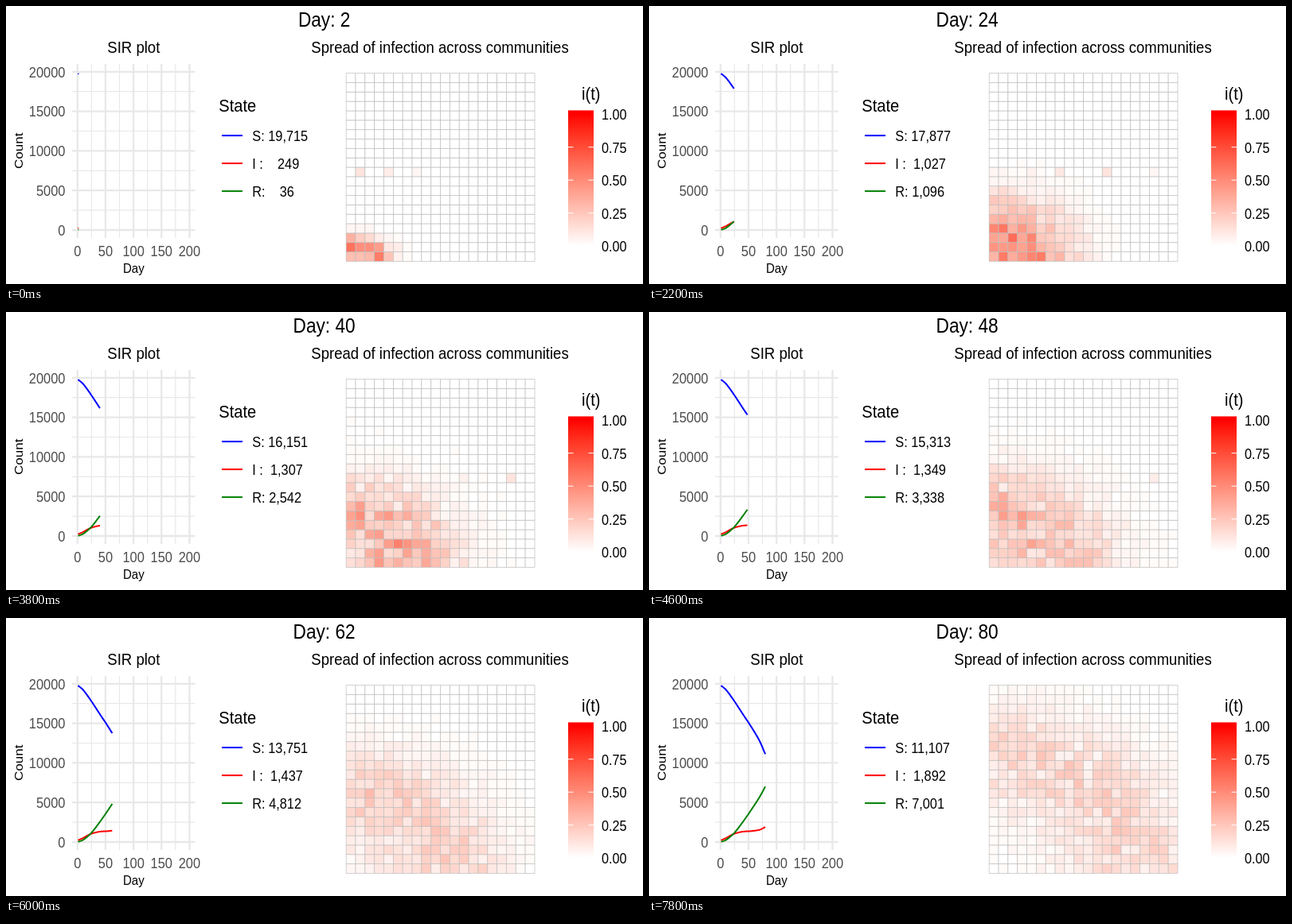
An HTML page that plays this animation: 800x350 px, repeating every 8 s.

```html
<!DOCTYPE html>
<html lang="en">
<head>
<meta charset="utf-8">
<title>SIR spread</title>
<style>
  html, body { margin: 0; width: 100%; height: 100%; overflow: hidden; background: #fff; }
  svg { display: block; width: 100%; height: 100%; }
  text { font-family: "Liberation Sans", Arial, sans-serif; white-space: pre; }
</style>
</head>
<body>
<svg id="stage" viewBox="0 0 800 350"></svg>
<script>
const svg = document.getElementById('stage');
const LOOP = 8000, STEP = 200, N = 20, PEOPLE = 50;
const SQUEEZE = 0.885; // the whole plot is narrower than it is tall

function add(tag, attrs, parent = svg) {
  const el = document.createElementNS('http://www.w3.org/2000/svg', tag);
  for (const k in attrs) el.setAttribute(k, attrs[k]);
  parent.appendChild(el);
  return el;
}
function label(str, x, y, size, anchor = 'start', fill = '#000', turn = 0) {
  const el = add('text', {
    transform: `translate(${x} ${y}) scale(${SQUEEZE} 1) rotate(${turn})`,
    'font-size': size, 'text-anchor': anchor, fill
  });
  el.textContent = str;
  return el;
}
const line = (x1, y1, x2, y2, stroke, width) =>
  add('line', { x1, y1, x2, y2, stroke, 'stroke-width': width });

// Day, infected, recovered: key points of the two smooth curves
const KEYS = [
  [2, 249, 36], [10, 504, 270], [24, 1027, 1096], [40, 1307, 2542],
  [54, 1374, 3964], [70, 1548, 5706], [80, 1892, 7001]
];
function curve(d, col) {
  const last = KEYS.length - 1;
  const slope = i => {
    const a = KEYS[Math.max(0, i - 1)], b = KEYS[Math.min(last, i + 1)];
    return (b[col] - a[col]) / (b[0] - a[0]);
  };
  let i = 0;
  while (i < last - 1 && d > KEYS[i + 1][0]) i++;
  const p = KEYS[i], q = KEYS[i + 1];
  const h = q[0] - p[0], u = (d - p[0]) / h, v = 1 - u;
  return Math.round(p[col] * v * v * (1 + 2 * u) + q[col] * u * u * (3 - 2 * u)
    + h * u * v * (slope(i) * v - slope(i + 1) * u));
}
function counts(d) {
  const i = curve(d, 1), r = curve(d, 2);
  return [N * N * PEOPLE - i - r, i, r];
}

function rand(a, b, c) {
  let h = Math.imul(a + 11, 374761393) ^ Math.imul(b + 7, 668265263) ^ Math.imul(c + 3, 1274126177);
  h = Math.imul(h ^ (h >>> 13), 1103515245);
  h = Math.imul(h ^ (h >>> 16), 2246822519);
  return ((h ^ (h >>> 15)) >>> 0) / 4294967296;
}
function noise(c, r, d) {
  const t = d / 10, k = Math.floor(t), u = t - k;
  return rand(c, r, k) * (1 - u) + rand(c, r, k + 1) * u;
}

// A noisy ring grows out of the lower left corner
function shares(d) {
  const ridge = 1 + 0.0017 * d * d;
  const ahead = 0.8 + 4.6 * (1 - Math.exp(-d / 18));
  const behind = 3 + 0.04 * d;
  const kx = 0.8 - 0.3 * Math.exp(-d / 15);
  const v = [];
  let sum = 0;
  for (let r = 0; r < N; r++) for (let c = 0; c < N; c++) {
    const off = Math.hypot(c * kx, r) - ridge;
    const wave = Math.exp(-((off / (off > 0 ? ahead : behind)) ** 2));
    const x = wave * (0.35 + 1.3 * noise(c, r, d));
    v.push(x);
    sum += x;
  }
  const gain = counts(d)[1] / PEOPLE / sum;
  const out = v.map((x, i) => {
    const people = x * gain * PEOPLE + (noise(i, 40, d) - 0.5) * 0.8;
    return Math.max(0, Math.round(people)) / PEOPLE;
  });
  // Early outbreaks far from the ring
  for (const c of [1, 4, 7, 12, 17]) {
    const i = 9 * N + c, share = 0.12 * Math.exp(-(((d - 4 - 2 * c) / 14) ** 2));
    out[i] = Math.max(out[i], Math.round(share * PEOPLE) / PEOPLE);
  }
  return out;
}

function heat(t) {
  const fade = p => Math.round(255 * (1 - t) ** p);
  return `rgb(255,${fade(0.88)},${fade(1.1)})`;
}

// Line chart
const px = d => 89.8 + d * 0.703, py = n => 282 - n * 0.00996;
const GRID = '#e8e8e8';
for (let i = 0; i < 4; i++) {
  const x = px(25 + 50 * i), y = py(2500 + 5000 * i);
  line(x, 73, x, 292, GRID, 1.2);
  line(83, y, 237.5, y, GRID, 1.2);
}
for (let i = 0; i < 5; i++) {
  const x = px(50 * i), y = py(5000 * i);
  line(x, 73, x, 292, GRID, 2.3);
  line(83, y, 237.5, y, GRID, 2.3);
  label(50 * i, x, 315, 18.6, 'middle', '#4d4d4d');
  label(5000 * i, 74.5, y + 6.8, 18.6, 'end', '#4d4d4d');
}
label('SIR plot', 160.3, 58.6, 21, 'middle');
label('Day', 160.3, 336.3, 17, 'middle');
label('Count', 21, 182.3, 17, 'middle', '#000', -90);
label('State', 267.3, 132.9, 22.7);

const tags = [], paths = [];
['#00f', '#f00', '#008000'].forEach((stroke, i) => {
  const y = 163.1 + 35 * i;
  line(271, y, 297, y, stroke, 2);
  tags.push(label('', 309.3, y + 6.8, 18.45));
  paths.push(add('path', { fill: 'none', stroke, 'stroke-width': 2, 'stroke-linejoin': 'round' }));
});

// Community map
label('Spread of infection across communities', 545, 58.6, 20.95, 'middle');
const title = label('', 399.6, 25.5, 25.6, 'middle');
const CELL = 11.84, cells = [];
for (let r = 0; r < N; r++) for (let c = 0; c < N; c++) {
  cells.push(add('rect', {
    x: 427.2 + c * CELL, y: 321.4 - (r + 1) * CELL, width: CELL, height: CELL,
    stroke: '#bebebe', 'stroke-opacity': 0.85, 'stroke-width': 0.8
  }));
}

// Colour bar
label('i(t)', 734.8, 117.9, 22.7, 'middle');
const ramp = add('linearGradient', { id: 'ramp', x1: 0, y1: 1, x2: 0, y2: 0 }, add('defs', {}));
for (let i = 0; i < N; i++) {
  add('stop', { offset: (i + 0.5) / N, 'stop-color': heat(i / (N - 1)) }, ramp);
}
add('rect', { x: 706, y: 131.4, width: 32, height: 175, fill: 'url(#ramp)' });
for (let i = 0; i < 5; i++) {
  const y = 302.2 - 41.5 * i;
  if (i < 4) {
    line(706, y, 712.4, y, '#fff', 1);
    line(731.6, y, 738, y, '#fff', 1);
  }
  label((i / 4).toFixed(2), 748, y + 6.8, 18.3);
}

function draw(day) {
  title.textContent = 'Day: ' + day;
  const [s, i, r] = counts(day).map(n => n.toLocaleString('en-US'));
  tags[0].textContent = 'S:' + s.padStart(7);
  tags[1].textContent = 'I :' + i.padStart(7);
  tags[2].textContent = 'R:' + r.padStart(6);
  const pts = [[], [], []];
  for (let d = 1; d <= day; d++) {
    counts(d).forEach((n, k) => pts[k].push(px(d).toFixed(2) + ' ' + py(n).toFixed(2)));
  }
  paths.forEach((p, k) => p.setAttribute('d', 'M' + pts[k].join('L')));
  shares(day).forEach((v, k) => cells[k].setAttribute('fill', heat(v)));
}

const start = performance.now();
let shown = 0;
function tick() {
  const t = Math.max(0, performance.now() - start) % LOOP;
  const day = 2 + 2 * Math.floor(t / STEP);
  if (day !== shown) draw(shown = day);
  requestAnimationFrame(tick);
}
tick();
</script>
</body>
</html>
```
